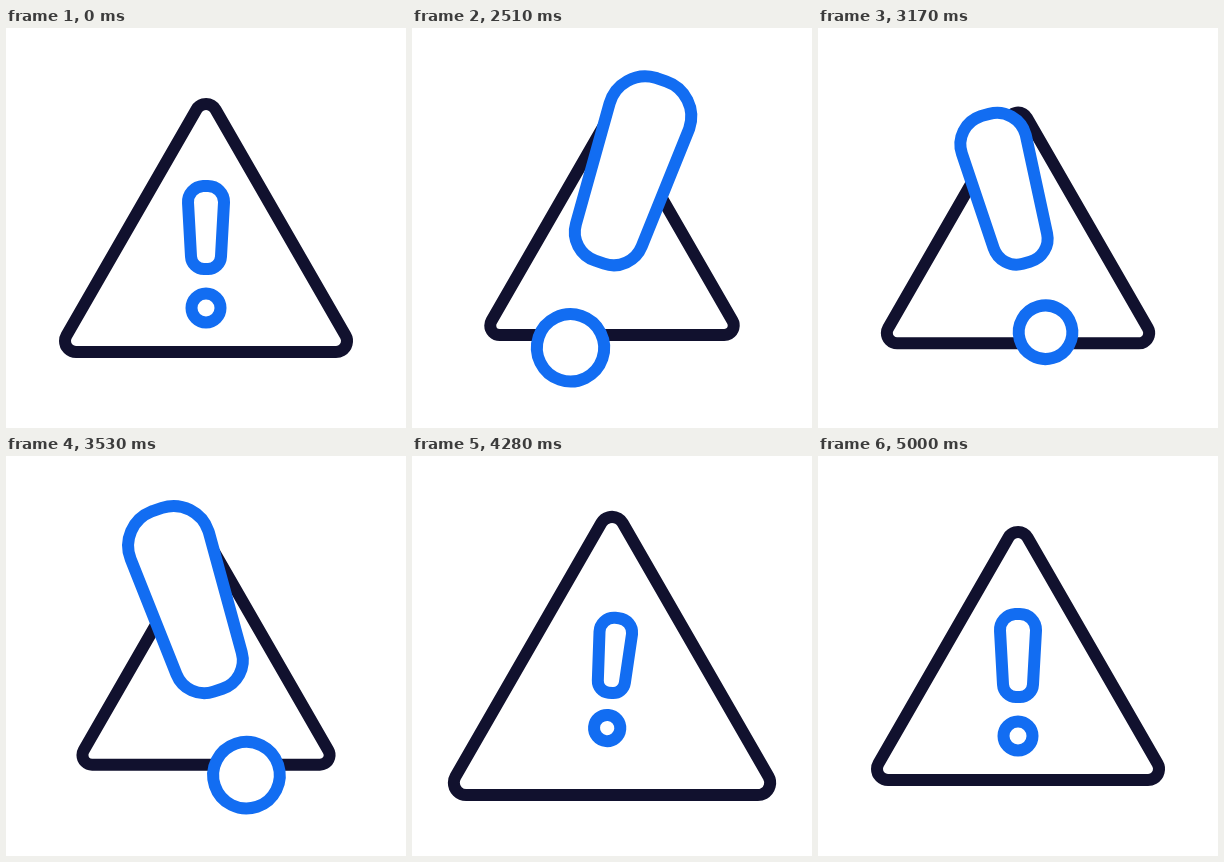
An HTML page with a canvas that plays this animation: 400x400 px, repeating every 5.03 s.

```html
<!DOCTYPE html>
<html lang="en">
<head>
<meta charset="utf-8">
<title>Warning sign</title>
<style>
  html, body { margin: 0; width: 100%; height: 100%; overflow: hidden; background: #fff; }
  canvas { display: block; }
</style>
</head>
<body>
<canvas id="stage" width="400" height="400"></canvas>
<script>
const ctx = document.getElementById('stage').getContext('2d');
const LOOP = 5030, START = 2030, STEP = 30;
const DARK = '#11112e', BLUE = '#126df2';

// Poses: rest, tilt right, cross over, tilt left, rebound, rest.
const TIMES = [2000, 2460, 2850, 3670, 4130, 4620];
const MARK_SCALE = [1, 2.35, 1.6, 2.35, 0.88, 1];
const MARK_ANGLE = [0, 19, -14, -19, 6, 0];
const TRIANGLE_SCALE = [1, 0.862, 0.947, 0.862, 1.128, 1];

const rad = deg => deg * Math.PI / 180;
const ease = u => (1 - Math.cos(Math.PI * u)) / 2;

// Value at time t, easing from pose to pose.
function pose(values, t) {
  const next = TIMES.findIndex(time => time > t);
  if (next < 1) return values[0];
  const i = next - 1;
  const u = (t - TIMES[i]) / (TIMES[next] - TIMES[i]);
  return values[i] + (values[next] - values[i]) * ease(u);
}

// The outline scales with its pose, the line weight does not.
function draw(color, x, y, scale, angle, outline) {
  ctx.save();
  ctx.translate(x, y);
  ctx.rotate(rad(angle));
  ctx.scale(scale, scale);
  ctx.beginPath();
  outline((cx, cy, r, from, to) => ctx.arc(cx, cy, r, rad(from), rad(to)));
  ctx.closePath();
  ctx.restore();
  ctx.fillStyle = '#fff';
  ctx.fill();
  ctx.strokeStyle = color;
  ctx.lineWidth = 12;
  ctx.stroke();
}

function triangle(arc) {
  arc(0, -113, 11, -150, -30);
  arc(130, 113, 11, -30, 90);
  arc(-130, 113, 11, 90, 210);
}

function bar(arc) {
  arc(2, -53, 16, -90, 3);
  arc(2, 1, 13, 3, 90);
  arc(-2, 1, 13, 90, 177);
  arc(-2, -53, 16, 177, 270);
}

function dot(arc) {
  arc(0, 53, 14.5, 0, 360);
}

function render(now) {
  const time = now % LOOP;
  const t = time < START ? 0 : START + Math.floor((time - START) / STEP) * STEP;
  // The tilt and the triangle follow the mark's size with a small delay.
  const scale = pose(MARK_SCALE, t);
  const angle = pose(MARK_ANGLE, t - 30);
  const x = 200 - angle / 10;
  const y = 227 - 28 * Math.abs(Math.log(scale));
  ctx.clearRect(0, 0, 400, 400);
  draw(DARK, 200, 200, pose(TRIANGLE_SCALE, t - 80), 0, triangle);
  draw(BLUE, x, y, scale, angle, bar);
  draw(BLUE, x, y, scale, angle, dot);
}

const begin = performance.now();
function loop() {
  render(performance.now() - begin);
  requestAnimationFrame(loop);
}
loop();
</script>
</body>
</html>
```
